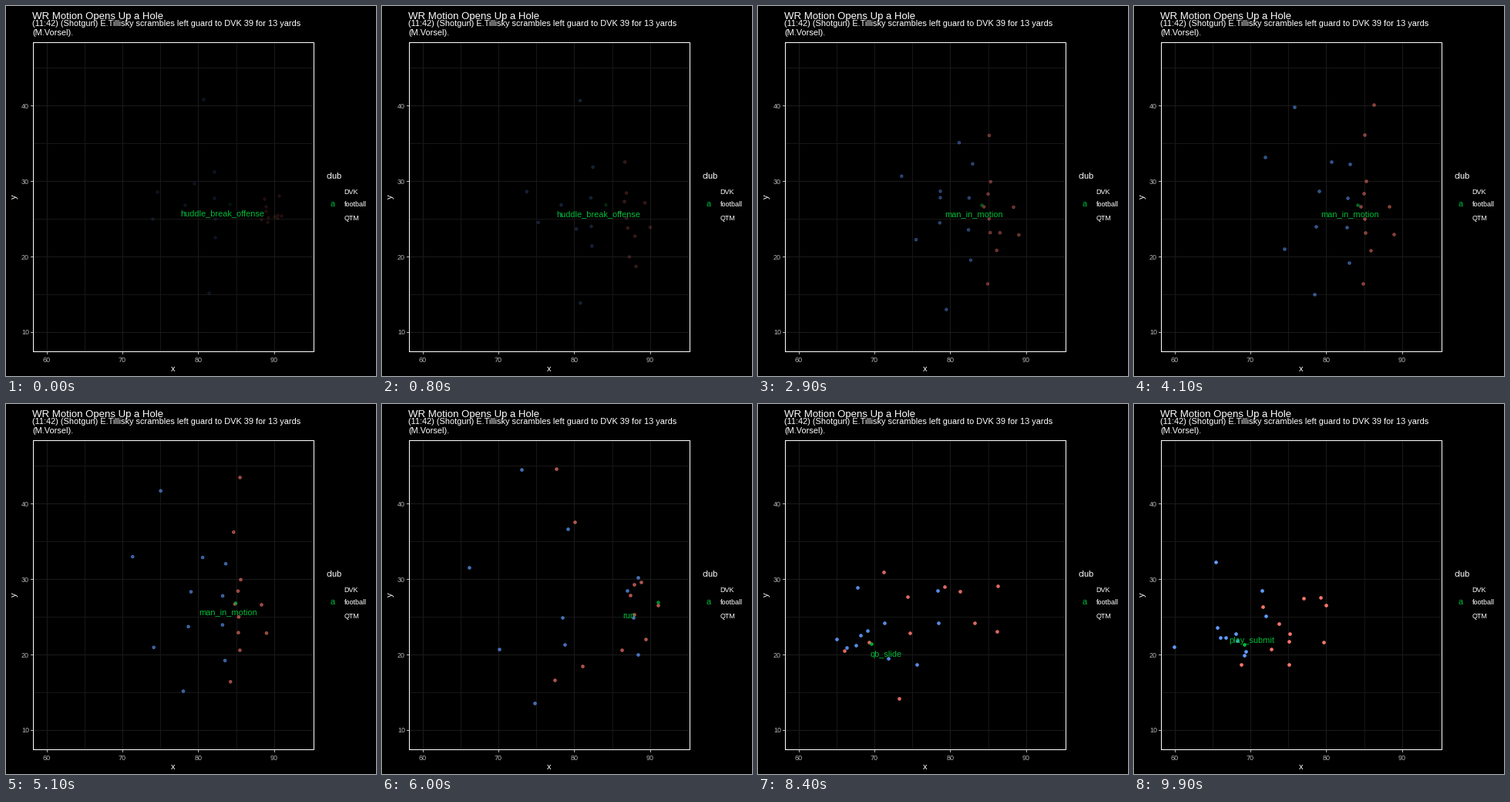
Recreate the animation shown at these times as a matplotlib script. Size 480 by 480 pixels, loop 10000 ms.

```python
import numpy as np
import matplotlib.pyplot as plt
from matplotlib.animation import FuncAnimation
from matplotlib.colors import to_rgb

FRAMES, STEP = 100, 100
RED, GREEN, BLUE = "#F8766D", "#00BA38", "#619CFF"
TIMES = (0, 17, 41, 60, 75, 84, 99)
SNAP = 53

plt.rcParams["font.family"] = "Liberation Sans"
fig = plt.figure(figsize=(480 / 72, 480 / 72), dpi=72, facecolor="black")
ax = fig.add_axes([0, 0, 1, 1])
ax.axis("off")
ax.set_xlim(-0.5, 479.5)
ax.set_ylim(479.5, -0.5)


def monotone(t, p):
    """Monotone cubic through (t, p), sampled once per frame."""
    h = np.diff(t)
    d = np.diff(p) / h
    prod = d[:-1] * d[1:]
    same = prod > 0
    inner = np.where(same, 2 * prod / np.where(same, d[:-1] + d[1:], 1), 0)
    m = np.concatenate([d[:1], inner, d[-1:]])
    f = np.arange(FRAMES)
    i = np.clip(np.searchsorted(t, f, side="right") - 1, 0, len(h) - 1)
    u = (f - t[i]) / h[i]
    return ((1 + 2 * u) * (1 - u) ** 2 * p[i] + u * (1 - u) ** 2 * h[i] * m[i]
            + u * u * (3 - 2 * u) * p[i + 1] + u * u * (u - 1) * h[i] * m[i + 1])


tracks, colors = [], []


def track(color, *spots, via=None):
    """Add a dot passing its spots at TIMES, plus extra timed spots."""
    keys = dict(zip(TIMES, spots))
    before, after = np.array(spots[2]), np.array(spots[3])
    keys[SNAP] = tuple(before + 0.12 * (after - before))
    keys.update(via or {})
    t = np.array(sorted(keys), float)
    p = np.array([keys[k] for k in sorted(keys)], float)
    tracks.append(np.column_stack([monotone(t, p[:, 0]), monotone(t, p[:, 1])]))
    colors.append(to_rgb(color))


def offense(*spots, via=None):
    track(RED, *spots, via=via)


def defense(*spots, via=None):
    track(BLUE, *spots, via=via)


# receivers and backs
offense((352, 271), (313, 384), (311, 128), (226, 84), (202, 122), (163, 218),
        (167, 263), via={20: (314, 379), 44: (309, 102), 53: (300, 93), 67: (204, 65)})
offense((335, 250), (300, 168), (299, 167), (250, 153), (228, 237), (194, 250), (188, 285))
offense((352, 275), (298, 360), (297, 360), (224, 358), (210, 322), (112, 320), (139, 338))
offense((348, 273), (312, 316), (307, 317), (260, 340), (250, 428), (183, 382),
        (201, 338), via={66: (257, 395)})
offense((357, 272), (340, 297), (337, 296), (342, 305), (350, 285), (281, 284), (202, 298))
# line
offense((337, 260), (302, 229), (301, 227), (336, 231), (345, 220), (311, 236), (249, 261))
offense((337, 266), (298, 244), (298, 243), (327, 234), (311, 202), (242, 237), (220, 252))
offense((331, 277), (292, 260), (294, 260), (322, 248), (322, 233), (262, 243), (242, 251))
offense((340, 274), (300, 275), (299, 276), (327, 273), (357, 276), (310, 295), (246, 309))
offense((339, 280), (303, 293), (300, 294), (311, 319), (215, 267), (197, 297), (201, 308))
# quarterback
offense((354, 246), (331, 261), (331, 260), (358, 261), (234, 313), (144, 309),
        (178, 318), via={53: (331, 260), 66: (378, 263)})

# ball
track(GREEN, (290, 257), (290, 258), (290, 258), (358, 257), (228, 308), (147, 311),
      (143, 312), via={54: (290, 258), 57: (342, 258), 66: (379, 260)})
ball = tracks[-1]

# secondary
defense((256, 121), (261, 141), (256, 202), (241, 162), (202, 238), (133, 300),
        (108, 290), via={11: (257, 123), 22: (262, 155)})
defense((244, 230), (257, 330), (208, 131), (181, 85), (167, 147), (129, 238),
        (106, 205), via={53: (198, 108)})
defense((196, 241), (193, 239), (170, 196), (113, 212), (136, 234), (102, 305),
        (52, 315), via={11: (186, 240), 28: (186, 222), 33: (185, 213), 44: (165, 197),
                        55: (147, 205), 67: (74, 220), 88: (72, 312), 93: (50, 316)})
defense((263, 372), (251, 398), (234, 374), (198, 388), (232, 369), (127, 313),
        (119, 303), via={23: (249, 404), 33: (240, 384), 53: (228, 372)})
defense((190, 276), (211, 286), (195, 315), (152, 318), (187, 329), (115, 316), (112, 303))
defense((232, 258), (232, 257), (240, 240), (234, 277), (206, 267), (142, 294), (134, 307))
defense((230, 268), (234, 275), (236, 286), (237, 312), (244, 289), (169, 330), (143, 326))
# front
defense((270, 215), (276, 204), (280, 205), (332, 225), (327, 212), (233, 242), (166, 242))
defense((270, 249), (271, 248), (277, 249), (318, 242), (330, 264), (234, 284), (171, 275))
defense((271, 276), (271, 292), (276, 287), (326, 277), (246, 268), (164, 284), (132, 298))
defense((271, 300), (273, 321), (279, 333), (332, 325), (315, 309), (206, 338), (145, 321))

# start, event, offset from the ball
EVENTS = [
    (0, "huddle_break_offense", -10, 15),
    (12, "line_set", 7, -4),
    (22, "man_in_motion", -10, 15),
    (55, "run", -38, 20),
    (73, "qb_slide", -15, 10),
    (80, "qb_slide", 19, 17),
    (90, "play_submit", 9, -3),
]


def line(x, y, color, z=1):
    ax.plot(x, y, color=color, lw=1, zorder=z, solid_capstyle="butt",
            antialiased=False)


def write(x, y, s, size=11, color="white", ha="left", va="baseline", **kw):
    return ax.text(x, y, s, size=size, color=color, ha=ha, va=va, zorder=6, **kw)


LEFT, TOP, RIGHT, BOTTOM = 34, 46, 398, 447


def px(v):
    return 52 + (v - 60) * 9.84


def py(v):
    return 422 - (v - 10) * 9.78


def grid_color(v):
    return "#161616" if v % 10 else "#1a1a1a"


for v in range(60, 91, 5):
    line([px(v)] * 2, [TOP, BOTTOM], grid_color(v))
for v in range(10, 46, 5):
    line([LEFT, RIGHT], [py(v)] * 2, grid_color(v))
for v in range(60, 91, 10):
    line([px(v)] * 2, [BOTTOM, BOTTOM + 3], "#b3b3b3")
    write(px(v), 461, str(v), 9, "#b3b3b3", "center")
for v in range(10, 41, 10):
    line([LEFT - 3, LEFT], [py(v)] * 2, "#b3b3b3")
    write(29.5, py(v) + 4, str(v), 9, "#b3b3b3", "right")
line([LEFT, RIGHT, RIGHT, LEFT, LEFT], [TOP, TOP, BOTTOM, BOTTOM, TOP], "white", 5)

write(34, 17, "WR Motion Opens Up a Hole", 13.2)
write(34, 26, "(11:42) (Shotgun) E.Tillisky scrambles left guard to DVK 39 for 13 yards")
write(34, 37, "(M.Vorsel).")
write(216, 473, "x", ha="center")
write(10, 247, "y", ha="center", va="center", rotation=90)

write(415, 223, "club")
write(423, 260, "a", color=GREEN, ha="center")
for y, name in ((243, "DVK"), (260, "football"), (277, "QTM")):
    write(438, y, name, 9)

paths = np.array(tracks)
rgba = np.column_stack([colors, np.ones(len(colors))])
dots = ax.scatter(paths[:, 0, 0], paths[:, 0, 1], s=13, linewidths=1, zorder=3)
label = write(0, 0, "", color=GREEN, ha="center")


def draw(i):
    dots.set_offsets(paths[:, i])
    rgba[:, 3] = min(1, 0.1 + 0.9 * i / (FRAMES - 1))
    dots.set_facecolor(rgba)
    dots.set_edgecolor(rgba)
    _, text, dx, dy = [e for e in EVENTS if e[0] <= i][-1]
    label.set_text(text)
    label.set_position((ball[i, 0] + dx, ball[i, 1] + dy))
    return dots, label


anim = FuncAnimation(fig, draw, frames=FRAMES, interval=STEP, repeat=True,
                     repeat_delay=0)
plt.show()
```
